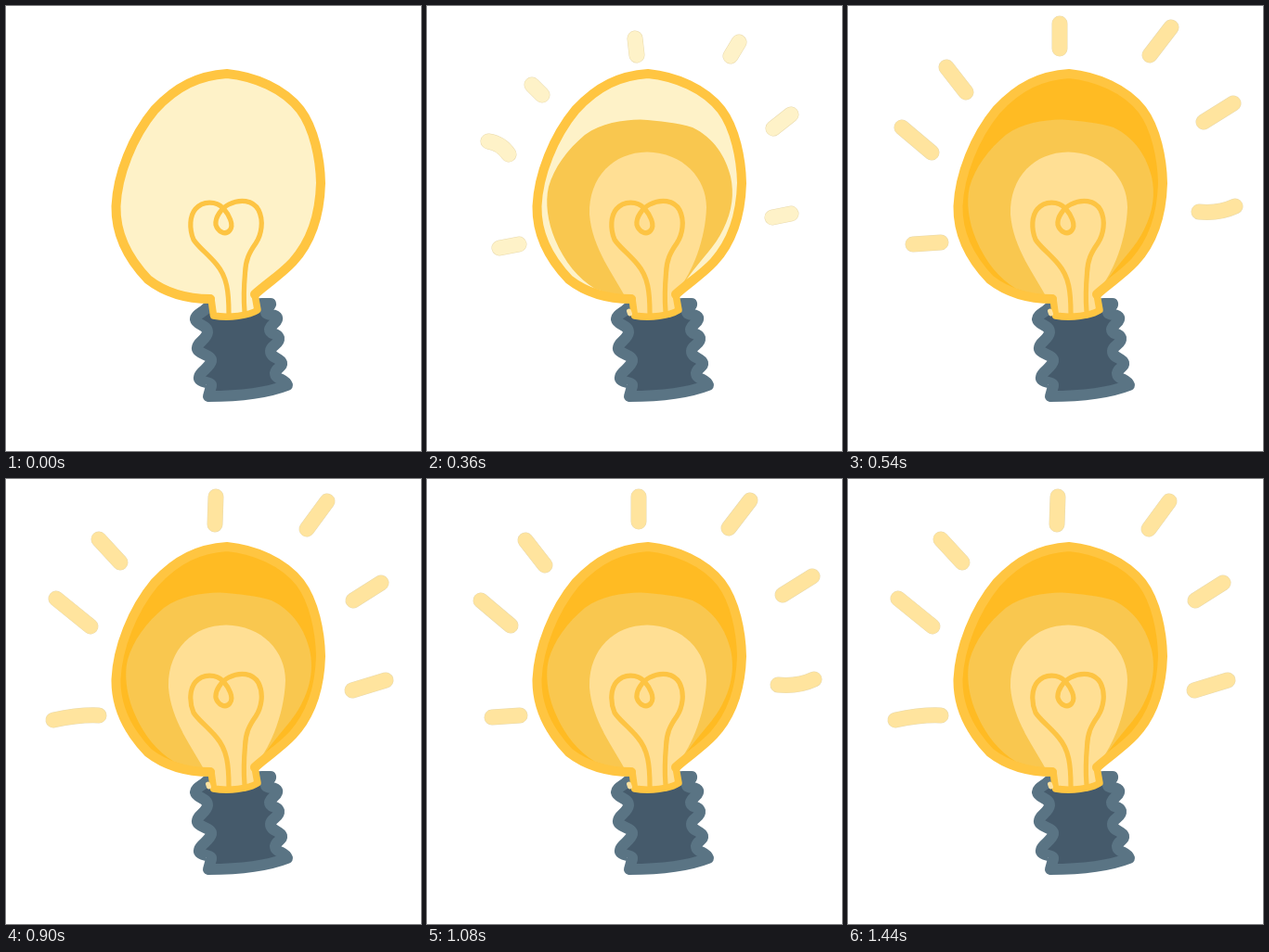
An HTML page for the animation above (1620 ms loop, 447 by 480 pixels).

```html
<!DOCTYPE html>
<html lang="en">
<head>
<meta charset="utf-8">
<title>Light bulb</title>
<style>
  html, body { margin: 0; width: 100%; height: 100%; overflow: hidden; background: #fff; }
  svg { display: block; width: 100vw; height: 100vh; }
  path { stroke-linecap: round; stroke-linejoin: round; }
</style>
</head>
<body>
<svg viewBox="0 0 447 480" fill="none">
  <!-- screw base -->
  <path fill="#455a6b" stroke="#5a7484" stroke-width="12"
    d="M216 326C211 331 204 333 204 338C205 344 217 344 217 352C216 360 205 363 206 370
       C208 376 222 376 221 383C219 391 207 395 208 402C210 407 222 405 221 410L218 421
       C248 421 280 418 303 409C301 402 290 403 290 396C291 390 298 390 297 385
       C295 379 285 380 285 372C285 366 295 365 294 358C292 352 284 355 284 349
       C285 343 294 341 292 336C290 331 279 335 280 329C280 325 286 324 285 321L276 321Z"/>
  <!-- glass and glow -->
  <path id="glass"/>
  <path id="midGlow" fill="#f9c74f"
    d="M215 316L181 305C163 294 148 276 138 252C130 233 127 212 131 195C137 174 151 155 170 139
       C188 126 210 123 230 122.5C250 124 271 126 286 131C309 142 322 163 327 184
       C331 202 329 221 319 241C310 260 296 272 281 293L268 311Z"/>
  <path id="innerGlow" fill="#ffdf94"
    d="M213 313C202 291 178 262 175 225C174 184 201 158 237 157.5C276 158 301 186 301 217
       C300 252 286 287 270 307L272 328C258 335 235 336 219 333L222 313Z"/>
  <path stroke="#fdc443" stroke-width="5.2"
    d="M240 332C240 308 238 292 227 279C218 268 207 260 202 252C197 240 198 226 204 219
       C212 210 226 210 234 218C240 225 246 236 241 242C236 248 228 243 226 236
       C225 228 232 218 240 214C252 208 266 209 272 220C278 232 275 247 269 256
       C262 266 258 274 257.5 288C256 305 256 318 257 330"/>
  <path id="outline" stroke="#ffc541" stroke-width="10"/>
  <path id="neck" stroke="#ffc541" stroke-width="7.5"/>
  <path id="spot" stroke="#ffe2a0" stroke-width="5" d="M217.5 329L218.5 332"/>
  <path id="rayEdge" stroke="#e8d9ad" stroke-width="17"/>
  <path id="rays" stroke-width="16"/>
</svg>
<script>
const STEP = 180;
const PALE = "#fef2c8", WARM = "#ffe49e", DEEP = "#ffbb23";
const el = id => document.getElementById(id);

const dome = `M220 316C194 316 171 309 153 295C131 272 118 245 118.5 216
  C120 182 136 141 160 112C184 86 208 75 238 73C268 76 299 89 317 112
  C332 132 338.5 165 339 191C338 227 329 254 309 276C296 290 281 299 268 311`;
const collar = "L271 328C262 334 240 337 223.5 334L221 316";
el("glass").setAttribute("d", dome + collar);
el("outline").setAttribute("d", dome);
el("neck").setAttribute("d", "M268 311" + collar);

const rays = {
  none: "",
  dots: "M227 51h0M325 54h0M126 95h0M374 132h0M88 159h0M374 226.5h0M97 255h0",
  short: `M224 35L226 53M336 39L327 54M113 85L124 96M392 117L373 132
    M66 146Q80 148 88 160M372 228L392 224M78 261L99 257`,
  medium: `M228 19L228 46M348 23L325 53M106 66L127 93M415 105L383 125
    M58 131L90 158M378 222Q400 224 417 216M70 257L100 255`,
  long: `M221 14L224 51M350 10Q340 25 327 49M93 58L126 95M414 101Q390 112 378 126
    M44 120L93 156M371 228L423 218M56 263Q80 255 100 255`,
  tilted: `M226 19L225 49M346 24L324 54M100 65L123 90M404 112L374 131
    M54 129L91 159M373 228L409 217M51 260Q80 254 100 255`
};
const sequence = ["none", "dots", "short", "medium", "long", "tilted", "medium", "long", "tilted"];

function show(id, visible) {
  el(id).style.display = visible ? "" : "none";
}

function draw(step) {
  const path = rays[sequence[step]];
  const fullyLit = step >= 3;
  el("glass").setAttribute("fill", fullyLit ? DEEP : PALE);
  show("innerGlow", step >= 1);
  show("spot", step >= 1);
  show("midGlow", step >= 2);
  el("rayEdge").setAttribute("d", path);
  el("rays").setAttribute("d", path);
  el("rays").setAttribute("stroke", fullyLit ? WARM : PALE);
}

const start = performance.now();
function tick() {
  const elapsed = performance.now() - start;
  draw(Math.floor(elapsed / STEP) % sequence.length);
  requestAnimationFrame(tick);
}
tick();
</script>
</body>
</html>
```
